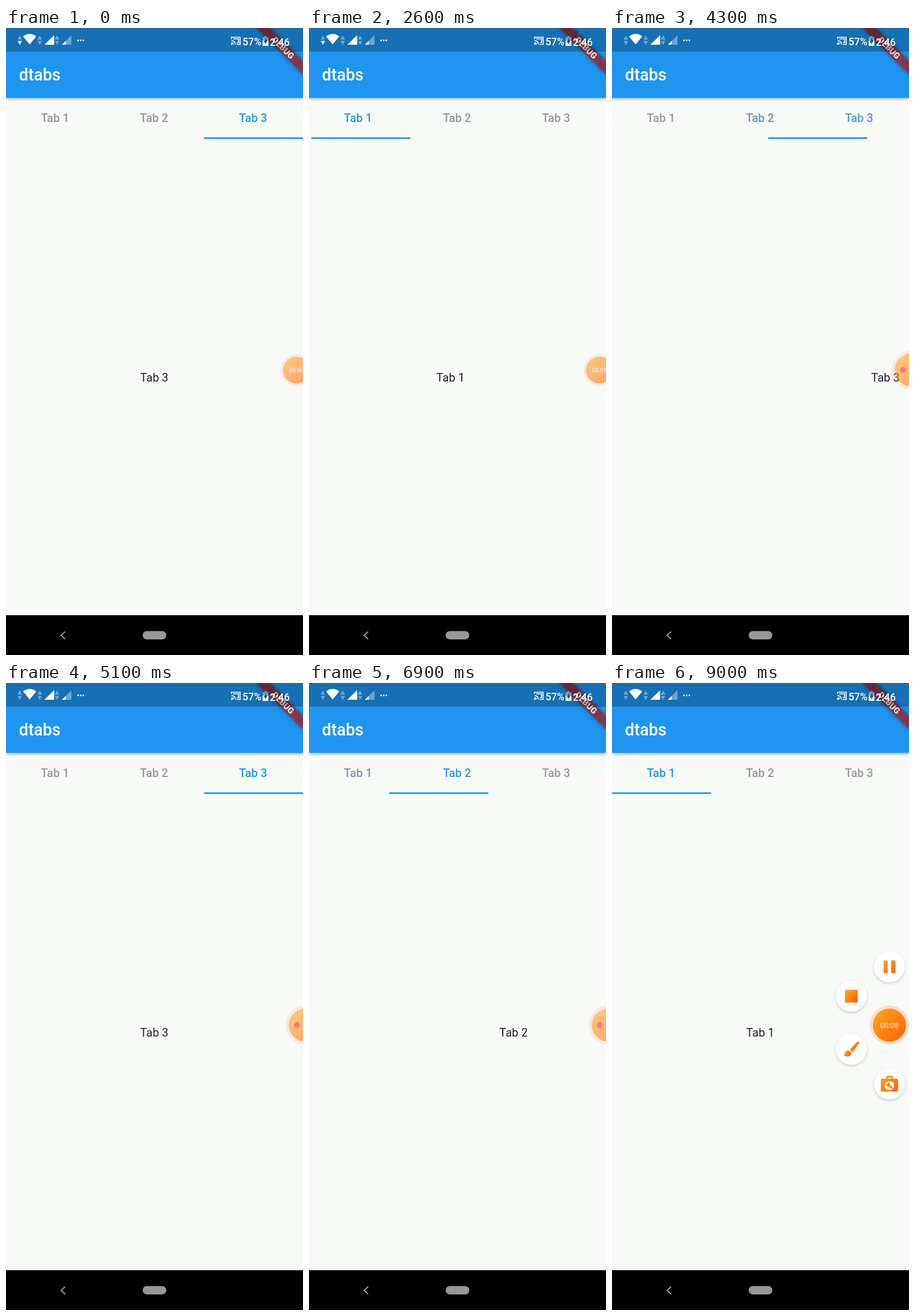
Write an HTML page that moves like this. It is 515x1087 px and loops after 9.1 s.

```html
<!DOCTYPE html>
<html lang="en">
<head>
<meta charset="utf-8">
<title>Tabs demo</title>
<style>
  html, body { margin: 0; width: 100%; height: 100%; overflow: hidden; background: #f8faf8; }
  svg { display: block; width: 515px; height: 1087px; font-family: Roboto, sans-serif; }
  .mid { text-anchor: middle; font-size: 20px; }
  .bold { font-weight: 500; }
  .dim { fill: #fff; opacity: .38; }
  .shade { filter: drop-shadow(0 2px 2px rgba(0, 0, 0, .18)); }
</style>
</head>
<body>
<svg viewBox="0 0 515 1087">
  <defs>
    <linearGradient id="orange" x1="0" y1="0" x2="1" y2="1">
      <stop offset="0" stop-color="#ffa724"/><stop offset="1" stop-color="#ff5f05"/>
    </linearGradient>
    <path id="arrows" d="M-4 20L0 13L4 20ZM-4 22.500H4L0 29.500Z"/>
  </defs>
  <rect width="515" height="1087" fill="#f8faf8"/>

  <g id="pages" fill="#212121"></g>
  <g id="labels" class="bold"></g>
  <rect id="line" y="189.500" width="171.670" height="2.900" fill="#2196f0"/>

  <rect width="515" height="121" fill="#2095f0" style="filter:drop-shadow(0 2px 2.500px rgba(0,0,0,.35))"/>
  <text x="22.500" y="91" font-size="28.600" class="bold" fill="#fff">dtabs</text>
  <g transform="translate(515 0) rotate(45)">
    <rect x="-57.200" y="40" width="114.400" height="17.200" fill="#b71c1c" fill-opacity=".63"
      style="filter:drop-shadow(0 0 4px rgba(0,0,0,.5))"/>
    <text y="53.800" text-anchor="middle" font-size="14.600" font-weight="900" fill="#fff" opacity=".85">DEBUG</text>
  </g>

  <rect width="515" height="41" opacity=".25"/>
  <g fill="#fff">
    <use href="#arrows" x="24" class="dim"/>
    <path id="down" d="M20.500 22.500H27.500L24 29Z"/>
    <path d="M41 28.500L29.500 14.500Q41 6 52.500 14.500Z"/>
    <use href="#arrows" x="58.500" class="dim"/>
    <path d="M66.500 29L83.500 12.500V29Z"/>
    <use href="#arrows" x="88.500" class="dim"/>
    <path class="dim" d="M97 29L113.500 12.500V29Z"/>
    <path d="M97 29L103.500 22.500V29Z"/>
    <circle cx="125" cy="21.500" r="1.400"/><circle cx="129.500" cy="21.500" r="1.400"/><circle cx="134" cy="21.500" r="1.400"/>
    <g fill="none" stroke="#fff" stroke-width="1.600">
      <path d="M391 19V16H406V28.500H400M391 21.500A7.500 7.500 0 0 1 398 28.500M391 25A4 4 0 0 1 394.500 28.500"/>
      <path d="M394 18.800H403.300V25.500H400.500"/>
    </g>
    <circle cx="391.500" cy="28" r="1.400"/>
    <text x="410" y="30" font-size="17.500" class="bold">57%</text>
    <path class="dim" d="M445 16H448V14H452V16H455V23H445Z"/>
    <path d="M445 22H455V31H445Z"/>
    <path d="M451 17L447 25H449.500V29L453.500 21.500H451Z" fill="#1b4f80"/>
    <text x="457.500" y="31" font-size="17.500" class="bold">2:46</text>
  </g>

  <g id="menu"></g>
  <g id="bubble">
    <circle r="34" fill="#ff7030" opacity=".2"/>
    <circle r="28.700" fill="url(#orange)"/>
    <text id="timer" y="4.500" text-anchor="middle" font-size="12.800" fill="#fff"></text>
  </g>
  <circle id="dot" cx="504.500" cy="593" r="5" fill="#ff7775"/>

  <rect y="1018" width="515" height="69"/>
  <path d="M102.500 1046.500L95.500 1053L102.500 1059.500" fill="none" stroke="#999" stroke-width="2"/>
  <rect x="237" y="1045.500" width="41" height="14.500" rx="7.250" fill="#979797"/>
</svg>
<script>
const LOOP = 9100, SWIPE = 800, TAB = 515 / 3;
const swipes = [[950, -1], [1998, -1], [3000, 1], [4039, 1], [5893, -1], [6800, -1]];
const buttons = [
  [481, 492, '<path d="M-10-11h7v22h-7zM3-11h7v22h-7z"/>'],
  [415, 543, '<rect x="-11" y="-11" width="22" height="22" rx="1.5"/>'],
  [415, 635, '<path d="M-3 1L9-12Q13-15 14-11L2 5ZM-5 2Q1 4 0 9C-3 14-10 13-14 10Q-11 10-11 7Q-10 2-5 2Z"/>'],
  [481, 695, '<path fill-rule="evenodd" d="M-12-9h6v-2q0-3 3-3h6q3 0 3 3v2h6q3 0 3 3v16q0 3-3 3h-24q-3 0-3-3v-16q0-3 3-3zM-3-9h6v-2h-6z"/>'
    + '<circle cy="3" r="8" fill="#fff"/><path d="M-4-1L5 8" stroke="#ff7b10" stroke-width="3.2"/>'
    + '<circle cx="-2.500" cy=".5" r="3.500"/><path d="M-6-3L-2.500 0" stroke="#fff" stroke-width="2.500"/>']
];
const $ = id => document.getElementById(id);
const clamp = v => Math.min(1, Math.max(0, v));
const mix = (a, b, u) => a + (b - a) * u;
const ease = u => (1 - (1 - u) ** 3) ** 1.5;
const show = (el, on) => el.style.display = on ? '' : 'none';
const place = (el, x, y, s) => el.setAttribute('transform', `translate(${x} ${y}) scale(${s})`);

for (let i = 0; i < 3; i++) {
  $('pages').innerHTML += `<text class="mid" y="613">Tab ${i + 1}</text>`;
  $('labels').innerHTML += `<text class="mid" x="${TAB * (i + .5) - .8}" y="162.500">Tab ${i + 1}</text>`;
}
$('menu').innerHTML = buttons.map(b =>
  `<g fill="url(#orange)"><circle class="shade" r="27" fill="#fdfefd"/>${b[2]}</g>`).join('');
const pages = [...$('pages').children], labels = [...$('labels').children], items = [...$('menu').children];

function draw(t) {
  const pos = swipes.reduce((p, [start, dir]) => p + dir * ease(clamp((t - start) / SWIPE)), 2);
  pages.forEach((p, i) => p.setAttribute('x', 257 + 515 * (i - pos)));
  labels.forEach((l, i) => {
    const u = clamp(1 - Math.abs(pos - i));
    l.setAttribute('fill', `rgb(${mix(151, 33, u)},${mix(152, 150, u)},${mix(151, 240, u)})`);
  });
  $('line').setAttribute('x', pos * TAB);
  show($('down'), t < 3500 || t >= 7000 && t < 9000);

  // The recorder bubble docks, hides on tap, then opens its menu.
  const dock = clamp((t - 3700) / 300), open = t >= 8100;
  const grow = 1 - (1 - clamp((t - 8000) / 400)) ** 2;
  const secs = Math.max(0, Math.floor((t - 1000) / 1000));
  show($('bubble'), t < 7900 || open);
  show($('dot'), dock === 1 && t < 7900);
  show($('menu'), open);
  show($('timer'), dock < 1 || open);
  $('timer').textContent = '00:0' + secs;
  $('bubble').setAttribute('opacity', open ? 1 : .57);
  place($('bubble'), open ? 481 : mix(503.5, 519, dock), 593, open ? 1 : mix(.81, 1, dock));
  items.forEach((el, i) => {
    const [x, y] = buttons[i];
    place(el, mix(481, x, grow), mix(593, y, grow), grow);
  });
}

const begin = performance.now();
function tick() {
  const t = (performance.now() - begin) % LOOP;
  draw(Math.floor(t / 100) * 100);
  requestAnimationFrame(tick);
}
tick();
</script>
</body>
</html>
```
